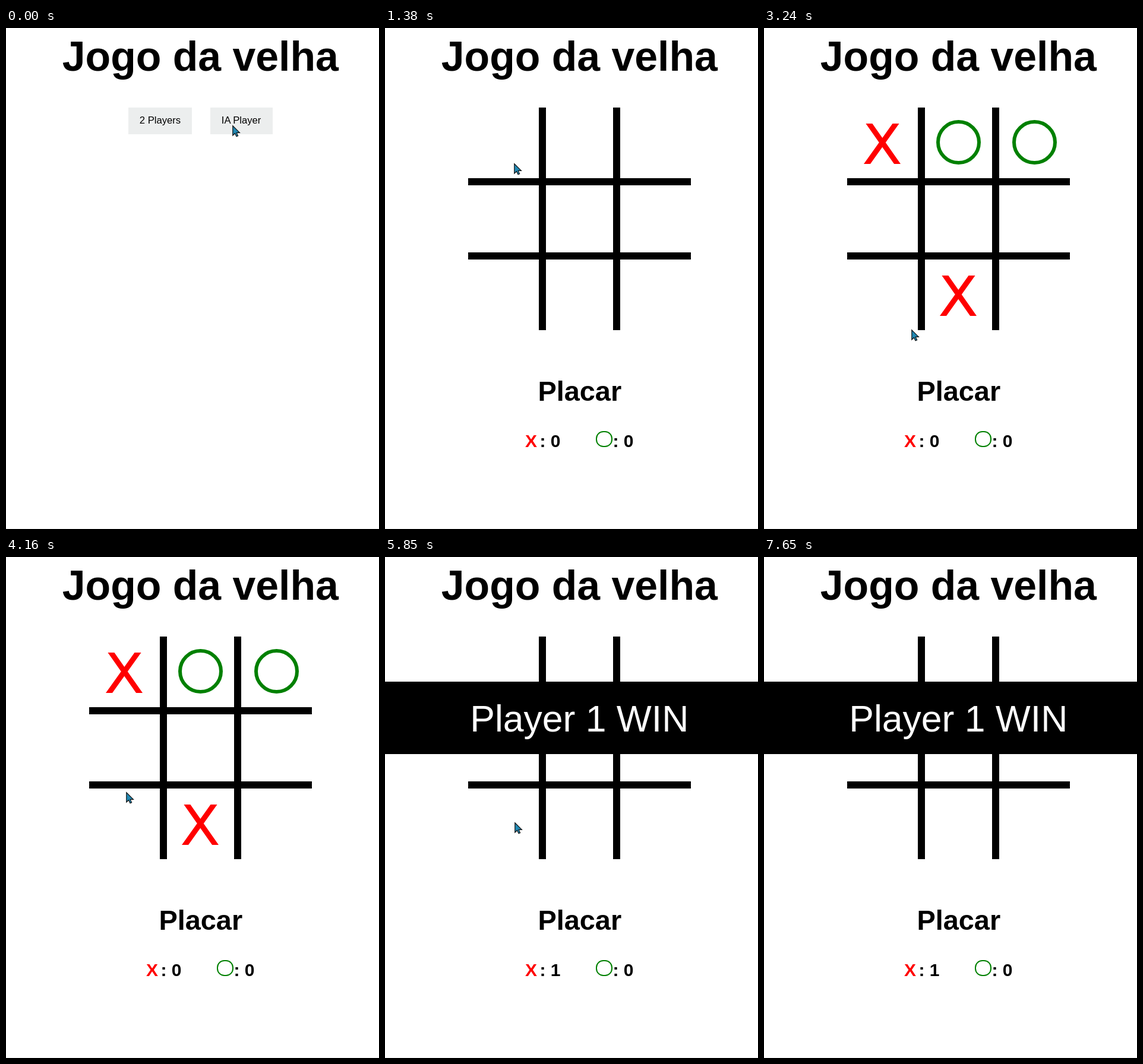
An HTML page for the animation above (7720 ms loop, 628 by 844 pixels).

```html
<!DOCTYPE html>
<html lang="pt">
<head>
<meta charset="utf-8">
<title>Jogo da velha</title>
<style>
  html, body { margin: 0; width: 100%; height: 100%; overflow: hidden; background: #fff; }
  svg { display: block; font-family: Arial, "Liberation Sans", sans-serif; }
  .bold { font-weight: bold; }
  .mid { text-anchor: middle; }
  .ring { fill: none; stroke: green; }
</style>
</head>
<body>
<svg width="628" height="844">
  <symbol id="x" viewBox="0 0 62 68">
    <path d="M.5 75L59 -7M4 -7L61.5 75" stroke="red" stroke-width="9"/>
  </symbol>
  <symbol id="o" viewBox="0 0 75 75">
    <circle class="ring" cx="37.5" cy="37.5" r="34.5" stroke-width="6"/>
  </symbol>

  <text class="bold mid" x="327.3" y="72" font-size="69.75">Jogo da velha</text>
  <path d="M0 843.5H628" stroke="#efefef"/>

  <g id="menu" font-size="16.667">
    <path fill="#eceeee" d="M206 134h107v45H206zM344 134h105v45H344z"/>
    <text x="224.75" y="161">2 Players</text>
    <text x="362.75" y="161">IA Player</text>
  </g>

  <g id="game">
    <path stroke="#000" stroke-width="12" d="M265 134V509M390 134V509M140 259H515M140 384H515"/>
    <g id="marks"></g>
    <text class="bold mid" x="327.8" y="628" font-size="46.875">Placar</text>
    <g class="bold" font-size="30">
      <text x="236" y="706" fill="red">X</text>
      <text x="260.5" y="706">: <tspan id="score">0</tspan></text>
      <rect class="ring" x="356" y="680" width="26" height="25" rx="11.5" stroke-width="2"/>
      <text x="383.5" y="706">: 0</text>
    </g>
  </g>

  <g id="banner">
    <rect y="210" width="628" height="122"/>
    <text class="mid" x="327.3" y="294" font-size="62.5" fill="#fff">Player 1 WIN</text>
  </g>

  <path id="cursor" fill="#2189b4" stroke="#111" stroke-width="1.2"
    d="M.8 .8V17L4.5 13.5 7 18.8 9.6 17.6 7.2 12.4H12.4Z"/>
</svg>
<script>
const LOOP = 7720, STEP = 77;
const START = 300, BOARD = 1070, WIN = 5700, LEAVE = 7100;

// Moves in order: time of the click, cell of X, cell of the answering O
const turns = [
  { at: 1460, x: [0, 0], o: [1, 0] },
  { at: 2920, x: [1, 2], o: [2, 0] },
  { at: 4400, x: [0, 1], o: [1, 1] }
];
const rowTop = [0, 131, 256];

// Key points of the cursor: time, x, y
const path = [
  [460, 381, 164], [840, 322, 380], [1460, 213, 222], [2070, 205, 583],
  [2310, 205, 583], [2850, 312, 470], [3240, 247, 508], [3930, 206, 422],
  [4700, 198, 353], [5080, 220, 407], [5850, 218, 447], [6160, 255, 633],
  [6480, 255, 633], [LEAVE, 570, 850]
];

const el = id => document.getElementById(id);
const show = (node, on) => node.style.display = on ? '' : 'none';

function mark(id, [col, row], left, top, width, height) {
  return `<use href="#${id}" x="${left + 128 * col}" y="${top + rowTop[row]}" width="${width}" height="${height}"/>`;
}
el('marks').innerHTML = turns.map(({ x, o }) =>
  `<g>${mark('x', x, 168, 161, 62, 68)}${mark('o', o, 162, 155, 75, 75)}</g>`).join('');

// Slope at a key point, zero where the direction turns or the cursor rests
function slope(i, axis) {
  const [a, b, c] = [path[i - 1], path[i], path[i + 1]];
  if (!a || !c) return 0;
  const before = (b[axis] - a[axis]) / (b[0] - a[0]);
  const after = (c[axis] - b[axis]) / (c[0] - b[0]);
  return before * after <= 0 ? 0 : 2 * before * after / (before + after);
}

function position(t, axis) {
  const next = path.findIndex(p => p[0] > t);
  if (next < 1) return path.at(next)[axis];
  const [a, b] = [path[next - 1], path[next]];
  const d = b[0] - a[0], u = (t - a[0]) / d, v = 1 - u;
  return v * v * (1 + 2 * u) * a[axis] + u * u * (3 - 2 * u) * b[axis]
    + d * u * v * (v * slope(next - 1, axis) - u * slope(next, axis));
}

function draw() {
  const t = performance.now() % LOOP;
  show(el('menu'), t < START);
  show(el('game'), t >= BOARD);
  show(el('banner'), t >= WIN);
  turns.forEach(({ at }, i) => show(el('marks').children[i], t >= at && t < WIN));
  el('score').textContent = t < WIN ? 0 : 1;

  const held = Math.floor((t + 10) / STEP) * STEP;
  const [x, y] = [1, 2].map(axis => Math.round(position(held, axis)));
  show(el('cursor'), t < LEAVE);
  el('cursor').setAttribute('transform', `translate(${x} ${y})`);
  requestAnimationFrame(draw);
}
draw();
</script>
</body>
</html>
```
